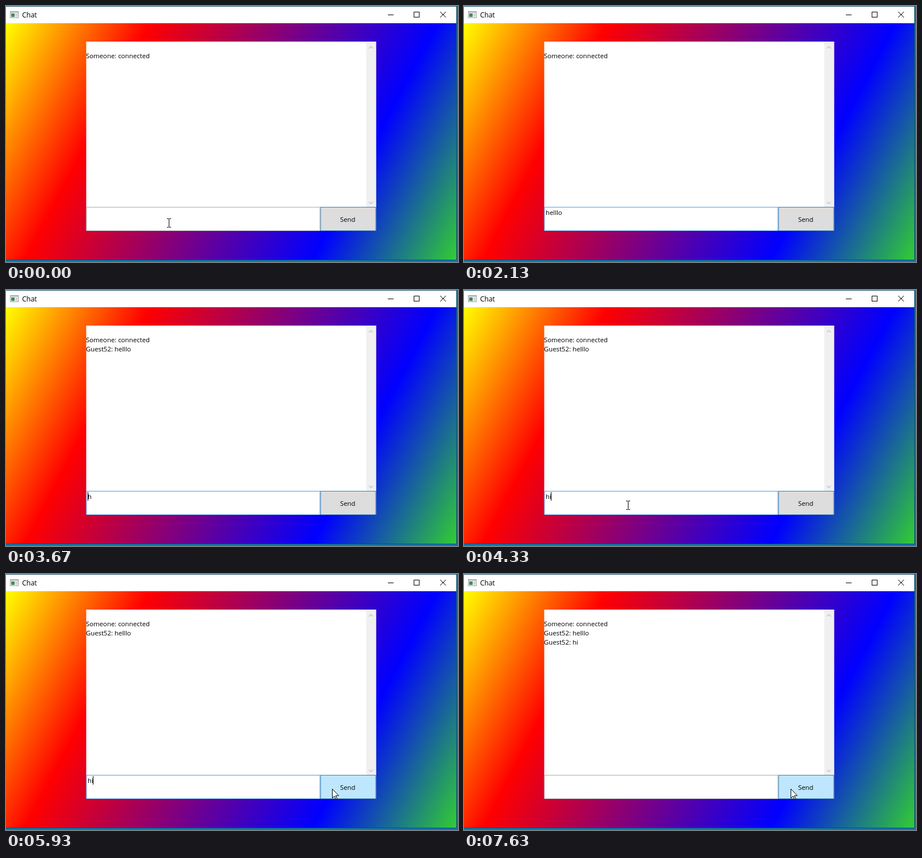
These frames come from a looping animation (786 by 446 pixels, 7660 ms). An HTML page:

```html
<!DOCTYPE html>
<html lang="en">
<head>
<meta charset="utf-8">
<title>Chat</title>
<style>
  html, body { margin: 0; width: 100%; height: 100%; overflow: hidden; background: #fff; }
  svg { display: block; width: 786px; height: 446px; }
  text { font: 11.3px "Open Sans", "Noto Sans", sans-serif; fill: #000; }
  .line { fill: none; stroke: #000; }
  .crisp { shape-rendering: crispEdges; }
</style>
</head>
<body>
<svg viewBox="0 0 786 446">
  <defs>
    <linearGradient id="rainbow" gradientUnits="userSpaceOnUse" x1="0" y1="30" x2="783" y2="442">
      <stop offset="0" stop-color="yellow"/>
      <stop offset=".25" stop-color="red"/>
      <stop offset=".75" stop-color="blue"/>
      <stop offset="1" stop-color="limegreen"/>
    </linearGradient>
  </defs>

  <!-- desktop behind the window -->
  <rect width="786" height="446" fill="#0a7ab4"/>
  <rect width="784" height="443" fill="#104c68"/>

  <!-- window -->
  <rect y="1" width="783" height="29" fill="#fff"/>
  <rect y="30" width="783" height="412" fill="url(#rainbow)"/>
  <g class="crisp">
    <rect x="7.5" y="9.5" width="14" height="11" fill="#f4f4f4" stroke="#a0a4a4"/>
    <rect x="8" y="10" width="13" height="2" fill="#b8c4cc"/>
    <rect x="9" y="13" width="6" height="6" fill="#4c8858"/>
    <rect x="16" y="13" width="4" height="6" fill="#d4d8d4"/>
  </g>
  <text x="28" y="20" style="font-size:12px">Chat</text>
  <path class="line crisp" d="M664 15.5h10M709.5 10.5h9v9h-9z"/>
  <path class="line" d="M755 10l10 10M765 10l-10 10"/>

  <!-- message list -->
  <rect x="139.5" y="62" width="504" height="329" fill="#fff"/>
  <rect x="626.5" y="62" width="17" height="288" fill="#f0f0f0"/>
  <path fill="none" stroke="#c4c4c4" stroke-width="1.3" d="M631 74l3.5-3.5 3.5 3.5M631 341l3.5 3.5 3.5-3.5"/>
  <text x="139" y="91">Someone: connected</text>
  <text x="139" y="107" id="first">Guest52: helllo</text>
  <text x="139" y="123" id="second">Guest52: hi</text>

  <!-- entry box and button -->
  <rect id="box" x="140" y="350.5" width="406" height="41" fill="#fff"/>
  <text x="142" y="364" id="entry"></text>
  <rect class="crisp" id="caret" y="352" width="1" height="15"/>
  <rect id="button" x="547" y="350.5" width="96" height="41" stroke="#3c7fb1"/>
  <text x="581" y="376">Send</text>

  <!-- pointers -->
  <path class="line crisp" id="beam" d="M-3 -7.5h3M1 -7.5h3M.5 -7v14M-3 7.5h3M1 7.5h3"/>
  <path id="arrow" fill="#fff" stroke="#000" stroke-linejoin="round"
        d="M.5 .5v16l3.7-3.6 2.5 5.8 2.2-1-2.5-5.6h5.1z"/>
</svg>
<script>
const LOOP = 7660, BLINK = 530;
const FOCUS = 350, SENT1 = 2500, SENT2 = 6800, MOUSE_BACK = 4120;
const words = [
  { text: "helllo", keys: [480, 620, 760, 900, 1120, 1300], sent: SENT1 },
  { text: "hi", keys: [3620, 3805], sent: SENT2 },
];
const mouse = [
  [0, 283, 378], [MOUSE_BACK, 283, 378], [4280, 285, 375], [4700, 285, 375],
  [5500, 567, 374], [6200, 567, 374], [6500, 568, 374],
];
const $ = id => document.getElementById(id);
const show = (id, on) => $(id).setAttribute("visibility", on ? "visible" : "hidden");

function mouseAt(t) {
  const i = mouse.findIndex(p => p[0] > t);
  if (i < 0) return mouse[mouse.length - 1].slice(1);
  const [t0, x0, y0] = mouse[i - 1], [t1, x1, y1] = mouse[i];
  const k = (t - t0) / (t1 - t0), e = k * k * (3 - 2 * k);
  return [x0 + (x1 - x0) * e, y0 + (y1 - y0) * e].map(Math.round);
}

function draw(t) {
  const word = words.find(w => t < w.sent);
  const typed = time => word ? word.keys.filter(k => k <= time).length : 0;
  const count = typed(t), focused = t >= FOCUS && t < SENT2;

  show("first", t >= SENT1);
  show("second", t >= SENT2);
  $("entry").textContent = word ? word.text.slice(0, count) : "";
  $("box").setAttribute("stroke", focused ? "#569de5" : "#abadb3");

  // The caret trails each key slightly and restarts its blink on input.
  const behind = typed(t - 60);
  const width = behind ? $("entry").getSubStringLength(0, behind) : 0;
  const inputs = [FOCUS, SENT1, ...words.flatMap(w => w.keys)];
  const last = Math.max(...inputs.filter(k => k <= t));
  $("caret").setAttribute("x", 142 + Math.floor(width));
  show("caret", focused && Math.floor((t - last) / BLINK) % 2 === 0);

  const [x, y] = mouseAt(t), hover = x >= 546;
  const visible = t < words[0].keys[0] || t >= MOUSE_BACK;
  $("button").setAttribute("fill", hover ? "#bee6fd" : "#ddd");
  for (const id of ["beam", "arrow"]) $(id).setAttribute("transform", `translate(${x} ${y})`);
  show("beam", visible && !hover);
  show("arrow", visible && hover);
}

const start = performance.now();
function frame() {
  draw((performance.now() - start) % LOOP);
  requestAnimationFrame(frame);
}
frame();
</script>
</body>
</html>
```
